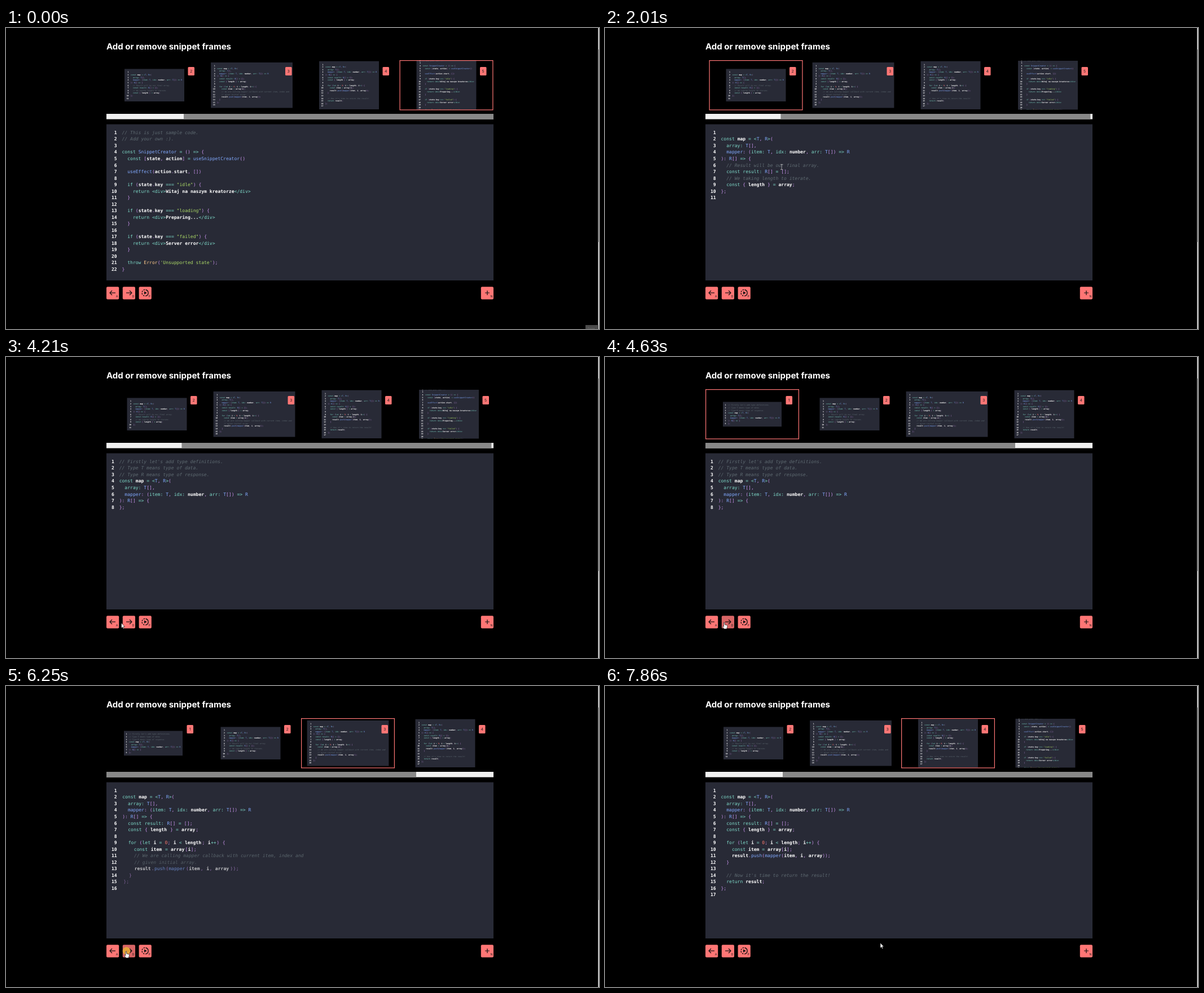
Animation of 1051x533 px, one loop 8000 ms. Source, as an HTML page with a canvas:

```html
<!DOCTYPE html>
<html lang="en">
<head>
<meta charset="utf-8">
<title>Snippet frames</title>
<style>
  html, body { margin: 0; width: 100%; height: 100%; overflow: hidden; background: #000; }
  canvas { display: block; }
</style>
</head>
<body>
<canvas id="stage" width="1051" height="533"></canvas>
<script>
const ctx = document.getElementById('stage').getContext('2d');
const LOOP = 8000, STEP = 201.5;
const ADVANCE = 4.855, LINE = 11.53, PAD = 8.5;
const CORAL = '#ff7675', PANEL = '#282a36';
const MONO = '8.06px "DejaVu Sans Mono", monospace';

const mapHead = `const map = <T, R>(
  array: T[],
  mapper: (item: T, idx: number, arr: T[]) => R
): R[] => {
`;
const loopHead = `
${mapHead}  const result: R[] = [];
  const { length } = array;

  for (let i = 0; i < length; i++) {
    const item = array[i];
`;
const branch = (key, text) => `  if (state.key === "${key}") {
    return <div>${text}</div>
  }

`;
const sources = [
`// Firstly let's add type definitions.
// Type T means type of data.
// Type R means type of response.
${mapHead}};`,
`
${mapHead}  // Result will be our final array.
  const result: R[] = [];
  // We taking length to iterate.
  const { length } = array;
};
`,
`${loopHead}    // We are calling mapper callback with current item, index and${' '}
    // given initial array.
    result.push(mapper(item, i, array));
  }
};
`,
`${loopHead}    result.push(mapper(item, i, array));
  }

  // Now it's time to return the result!
  return result;
};
`,
`// This is just sample code.
// Add your own :).

const SnippetCreator = () => {
  const [state, action] = useSnippetCreator()

  useEffect(action.start, [])

${branch('idle', 'Witaj na naszym kreatorze')}${branch('loading', 'Preparing...')}${branch('failed', 'Server error')}  throw Error('Unsupported state');
}`];

// Token rules in order of priority: pattern, colour, font style
const rules = [
  [/\/\/.*/, '#5f6b72', 'italic '],
  [/"[^"]*"|'[^']*'/, '#addb67', ''],
  [/\b(?:const|let|return|if|for|throw|div)\b/, '#7fdbca', ''],
  [/Error\b/, '#ffcb8b', ''],
  [/\d+/, '#f7786c', ''],
  [/\w+(?=\()|SnippetCreator|\b[TR]\b|mapper(?=:)/, '#82aaff', ''],
  [/\w+:/, '#7fdbca', ''],
  [/\w+\.\.\.|\w+/, '#ffffff', 'bold '],
  [/[=<>+\/]+/, '#7fdbca', ''],
  [/[^\s\w]/, '#c792ea', '']
];
const lexer = new RegExp(rules.map(r => `(${r[0].source})`).join('|'), 'g');

const snippets = sources.map(source => {
  const lines = source.split('\n');
  const digits = String(lines.length).length;
  const codeX = 17.8 + digits * ADVANCE;
  return {
    lines, codeX, numberX: 9 + digits * ADVANCE,
    width: codeX + Math.max(...lines.map(l => l.length)) * ADVANCE + 9.2,
    height: lines.length * LINE + PAD * 2,
    tokens: lines.map(line => [...line.matchAll(lexer)].map(m => {
      const [, color, style] = rules[m.slice(1).findIndex(g => g !== undefined)];
      return { text: m[0], col: m.index, color, style };
    }))
  };
});

// [step, value] lists; the latest entry holds
const selections = [[-9, 5], [2, 4], [4, 3], [6, 2], [17, 1], [25, 2], [29, 3], [32, 4]];
const scrolls = [[0, 170.5], [10, 166], [22, 70], [23, 0], [37, 17.7], [38, 125], [39, 170.5]];
const pointers = [
  [0, null], [7, ['beam', 313, 246]], [11, ['beam', 285, 310]], [12, ['beam', 232, 410]],
  [13, ['hand', 192, 469]], [14, ['hand', 190, 470]], [21, ['arrow', 204.5, 471]],
  [22, ['hand', 211.5, 470]], [29, ['hand', 213, 470]], [34, ['arrow', 350, 462]],
  [35, ['arrow', 488, 455]]
];
const clicks = [17, 25, 29, 31];
const indexAt = (list, step) => list.findLastIndex(e => e[0] <= step);
const valueAt = (list, step) => list[indexAt(list, step)][1];

function rect(x, y, w, h, color, r = 0) {
  ctx.fillStyle = color;
  ctx.beginPath();
  ctx.roundRect(x, y, w, h, r);
  ctx.fill();
}

function text(str, x, y, font, color, align = 'left') {
  ctx.font = font;
  ctx.fillStyle = color;
  ctx.textAlign = align;
  ctx.fillText(str, x, y);
}

function polyline(points, close) {
  ctx.beginPath();
  for (let i = 0; i < points.length; i += 2) ctx.lineTo(points[i], points[i + 1]);
  if (close) ctx.closePath();
}

// New lines slide in from the right and fade, one after another
function drawCode(snippet, previous, age = 9) {
  let fresh = -1;
  snippet.lines.forEach((line, row) => {
    const y = PAD + LINE * (row + 0.5) + 3.1;
    text(row + 1, snippet.numberX, y, 'bold ' + MONO, '#fff', 'right');
    if (fresh >= 0 || previous && previous.lines[row] !== line) fresh++;
    const moving = age < 4;
    for (const t of snippet.tokens[row]) {
      let shift = 0;
      if (moving) {
        const delay = fresh < 0 ? 0 : 0.02 * fresh + 0.01 * t.col;
        const rest = Math.min(1, Math.max(0, 1 - age / 3 + delay));
        shift = fresh < 0 ? 6 * rest ** 2 : 20 * rest ** 3;
        if (age >= 3) shift *= 0.3;
        if (fresh >= 0) ctx.globalAlpha = Math.min(1, Math.max(0, age * 0.7 - 0.1 * fresh));
      }
      text(t.text, snippet.codeX + t.col * ADVANCE + shift, y, t.style + MONO, t.color);
      ctx.globalAlpha = 1;
    }
  });
}

function drawThumbs(selected, scroll) {
  ctx.save();
  ctx.beginPath();
  ctx.rect(178, 56, 686, 91);
  ctx.clip();
  snippets.forEach((snippet, i) => {
    const x = 178 + 172.5 * i - scroll;
    const w = snippet.width * 0.4, h = snippet.height * 0.4;
    ctx.save();
    ctx.beginPath();
    ctx.rect(x, 58, 166, 86.5);
    ctx.clip();
    ctx.translate(x + 83 - w / 2, 101.3 - h / 2);
    rect(0, 0, w, h, PANEL);
    ctx.scale(0.4, 0.4);
    drawCode(snippet);
    ctx.restore();
    if (selected === i + 1) {
      ctx.strokeStyle = CORAL;
      ctx.lineWidth = 1.2;
      ctx.strokeRect(x + 0.6, 57.6, 164.8, 87.4);
    }
    rect(x + 142.5, 69, 11.5, 15, CORAL, 1.5);
    text(i + 1, x + 148.2, 79, '7px Inter, sans-serif', '#222', 'center');
  });
  ctx.restore();
  rect(178, 152, 686, 9.5, '#f1f1f1');
  rect(178 + scroll * 137 / 170.5, 152, 549, 9.5, '#888');
}

function drawArrowIcon(x, dir) {
  polyline([x - 5 * dir, 469, x + 5 * dir, 469]);
  ctx.stroke();
  polyline([x + dir, 465, x + 5 * dir, 469, x + dir, 473]);
  ctx.stroke();
}

function drawButtons(hovered) {
  [['A', 178], ['D', 206.8], ['P', 235.6], ['N', 841.8]].forEach(([key, x]) => {
    rect(x, 458.3, 22.2, 22.2, key === hovered ? '#d96565' : CORAL, 2);
    text(key, x + 18.7, 477.3, '5.5px Inter, sans-serif', '#222', 'center');
  });
  ctx.strokeStyle = '#111';
  ctx.lineWidth = 1.2;
  drawArrowIcon(189, -1);
  drawArrowIcon(218, 1);
  ctx.beginPath();
  ctx.moveTo(849, 469); ctx.lineTo(857, 469);
  ctx.moveTo(853, 465); ctx.lineTo(853, 473);
  ctx.stroke();
  ctx.lineWidth = 1.4;
  ctx.beginPath();
  ctx.arc(246.6, 469, 5.6, -1.4, 1.5);
  ctx.stroke();
  ctx.setLineDash([2.6, 1.7]);
  ctx.beginPath();
  ctx.arc(246.6, 469, 5.6, 1.8, 4.8);
  ctx.stroke();
  ctx.setLineDash([]);
  polyline([245, 466.2, 249.6, 469, 245, 471.8], true);
  ctx.fillStyle = '#111';
  ctx.fill();
}

function drawPointer([kind, x, y], clicking) {
  if (clicking) {
    ctx.fillStyle = 'rgba(232, 170, 55, .9)';
    ctx.beginPath();
    ctx.arc(x + 0.5, y - 1, 6.8, 0, 7);
    ctx.fill();
  }
  ctx.save();
  ctx.translate(x, y);
  ctx.lineWidth = 0.7;
  if (kind === 'beam') {
    ctx.strokeStyle = '#ccc';
    polyline([-2, -4.5, 2, -4.5]); ctx.stroke();
    polyline([0, -4.5, 0, 4.5]); ctx.stroke();
    polyline([-2, 4.5, 2, 4.5]); ctx.stroke();
  } else {
    polyline(kind === 'arrow'
      ? [0, 0, 0, 9, 2, 7.2, 3.4, 10.3, 4.7, 9.7, 3.4, 6.7, 6, 6.5]
      : [-1, 0, 0.6, 0, 0.8, 4, 5, 5, 5.6, 6, 5, 9, 4, 11.5, -0.3, 11.5, -3.2, 7.6, -2.5, 6.5, -1, 7.5], true);
    ctx.fillStyle = '#fff';
    ctx.strokeStyle = '#222';
    ctx.fill();
    ctx.stroke();
  }
  ctx.restore();
}

function draw(time) {
  const step = Math.floor((time % LOOP + 25) / STEP);
  const change = indexAt(selections, step);
  const [since, selected] = selections[change];
  const previous = change > 0 ? snippets[selections[change - 1][1] - 1] : null;
  const pointer = valueAt(pointers, step);
  const hovered = pointer && pointer[0] === 'hand' ? (pointer[1] < 200 ? 'A' : 'D') : '';

  ctx.textRendering = 'geometricPrecision';
  rect(0, 0, 1051, 533, '#000');
  text('Add or remove snippet frames', 178, 38, 'bold 15px Inter, sans-serif', '#fff');
  drawThumbs(selected, valueAt(scrolls, step));

  rect(178, 170.5, 686, 276.5, PANEL);
  ctx.save();
  ctx.translate(178, 170.5);
  drawCode(snippets[selected - 1], previous, step - since);
  ctx.restore();

  drawButtons(hovered);
  rect(1049.5, 0, 1.5, 533, '#f1f1f1');
  rect(1049.5, 38, 1.5, 341, '#888');
  if (step < 1) {
    rect(1027, 526, 23, 7, '#4b4b4b');
    text('Done', 1031, 534, '5px Inter, sans-serif', '#777');
  }
  if (pointer) drawPointer(pointer, clicks.includes(step));
}

function tick() {
  draw(performance.now());
  requestAnimationFrame(tick);
}
tick();
</script>
</body>
</html>
```
